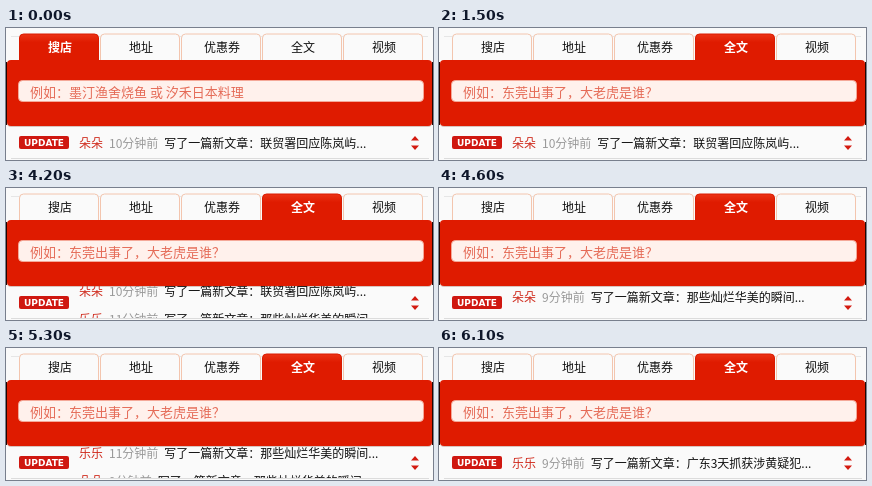
Animation, 427 px wide and 132 px high, one loop 6.5 s. Source, as an HTML page:

```html
<!DOCTYPE html>
<html lang="zh-CN">
<head>
<meta charset="utf-8">
<title>搜索</title>
<style>
  html, body { margin: 0; width: 100%; height: 100%; overflow: hidden; background: #fafafa; }
  svg { display: block; width: 427px; height: 132px; font: 12px "Noto Sans CJK SC", "Noto Sans CJK", sans-serif; }
  .tab path { fill: #fafafa; stroke: #f3c5ae; }
  .tab text { fill: #111; text-anchor: middle; }
  .tab.active path { fill: url(#red); stroke: #d91a00; }
  .tab.active text { fill: #fff; font-weight: bold; }
  #hint { font-size: 13px; fill: #e56b57; }
  .name { fill: #cf2a1c; }
  .age { fill: #999; }
  .post { fill: #111; }
  .badge { font: bold 9px "DejaVu Sans", sans-serif; fill: #fff; text-anchor: middle; }
</style>
</head>
<body>
<svg viewBox="0 0 427 132">
  <defs>
    <linearGradient id="red" x2="0" y2="1">
      <stop stop-color="#ec3215"/>
      <stop offset=".3" stop-color="#df1b00"/>
    </linearGradient>
    <clipPath id="window"><rect y="98" width="427" height="32"/></clipPath>
  </defs>

  <path d="M5 8.5H422" stroke="#e6e6e6"/>
  <g id="tabs"></g>

  <path d="M.5 34V97M426.5 34V97" stroke="#210400"/>
  <rect x="1" y="33" width="425" height="66" rx="4" fill="#d8c4bf"/>
  <rect x="1" y="32" width="425" height="66" rx="4" fill="#df1b00"/>
  <rect x="12.5" y="52.5" width="405" height="21" rx="4" fill="#fff1ec" stroke="#f4a898"/>
  <text id="hint" x="24" y="69"></text>

  <g clip-path="url(#window)"><g id="ticker"></g></g>
  <path d="M5 130.5H423" stroke="#dcdcdc"/>
  <rect x="13" y="108" width="50" height="13" rx="2" fill="#cf1710"/>
  <text class="badge" x="38" y="118">UPDATE</text>
  <path d="M405 112.5L409 108L413 112.5ZM405 117.5L409 122L413 117.5Z" fill="#d31a10"/>
</svg>
<script>
  const LOOP = 6500, ROW = 28, STEP = 100;
  const SCROLL_START = 4100, SLOW_START = 5300, SCROLL_END = 6100;

  const tabs = [
    { label: '搜店', from: 0, hint: '墨汀渔舍烧鱼 或 汐禾日本料理' },
    { label: '地址', from: 600, hint: '南城区云桥路 或 东城区梅园大道' },
    { label: '优惠券', from: 1100, hint: '火锅优惠券 或 电影票' },
    { label: '全文', from: 1500, hint: '东莞出事了，大老虎是谁？' },
    { label: '视频', from: Infinity, hint: '' }
  ];
  const posts = [
    ['朵朵', 10, '联贸署回应陈岚屿'],
    ['乐乐', 11, '那些灿烂华美的瞬间'],
    ['朵朵', 9, '那些灿烂华美的瞬间'],
    ['乐乐', 9, '广东3天抓获涉黄疑犯']
  ];
  const lastRow = 7;

  const byId = id => document.getElementById(id);
  const hint = byId('hint'), ticker = byId('ticker');

  byId('tabs').innerHTML = tabs.map(({ label }, i) => {
    const x = 13.5 + i * 81;
    return `<g class="tab">
      <path d="M${x} 34V10q0 -4 4 -4h71q4 0 4 4V34"/>
      <text x="${x + 40.5}" y="24">${label}</text></g>`;
  }).join('');
  const tabNodes = document.querySelectorAll('.tab');

  ticker.innerHTML = Array.from({ length: lastRow + 1 }, (_, i) => {
    const [name, minutes, title] = posts[i % posts.length];
    return `<text x="73" y="${119.5 + i * ROW}"><tspan class="name">${name}</tspan><tspan
      class="age" dx="3">${minutes}分钟前</tspan><tspan
      class="post" dx="6">写了一篇新文章：${title}...</tspan></text>`.replace(/<tspan\s+/g, '<tspan ');
  }).join('');
  // Keep the gaps independent of whitespace in the markup.
  ticker.querySelectorAll('.age').forEach(node => node.setAttribute('dx', 6));

  function scrollOffset(time) {
    const t = Math.min(Math.floor(time / STEP) * STEP, SCROLL_END);
    if (t < SCROLL_START) return 0;
    const speed = 0.125;
    if (t <= SLOW_START) return Math.floor((t - SCROLL_START) * speed);
    const reached = (SLOW_START - SCROLL_START) * speed;
    const rest = lastRow * ROW - reached, span = SCROLL_END - SLOW_START;
    const left = 1 - (t - SLOW_START) / span;
    return Math.round(reached + rest * (1 - left ** (speed * span / rest)));
  }

  function draw(now) {
    const time = now % LOOP;
    const active = tabs.filter(tab => tab.from <= time).length - 1;
    tabNodes.forEach((node, i) => node.classList.toggle('active', i === active));
    hint.textContent = '例如：' + tabs[active].hint;
    ticker.setAttribute('transform', `translate(0 ${-scrollOffset(time)})`);
  }

  const start = performance.now();
  function frame() {
    draw(performance.now() - start);
    requestAnimationFrame(frame);
  }
  frame();
</script>
</body>
</html>
```
